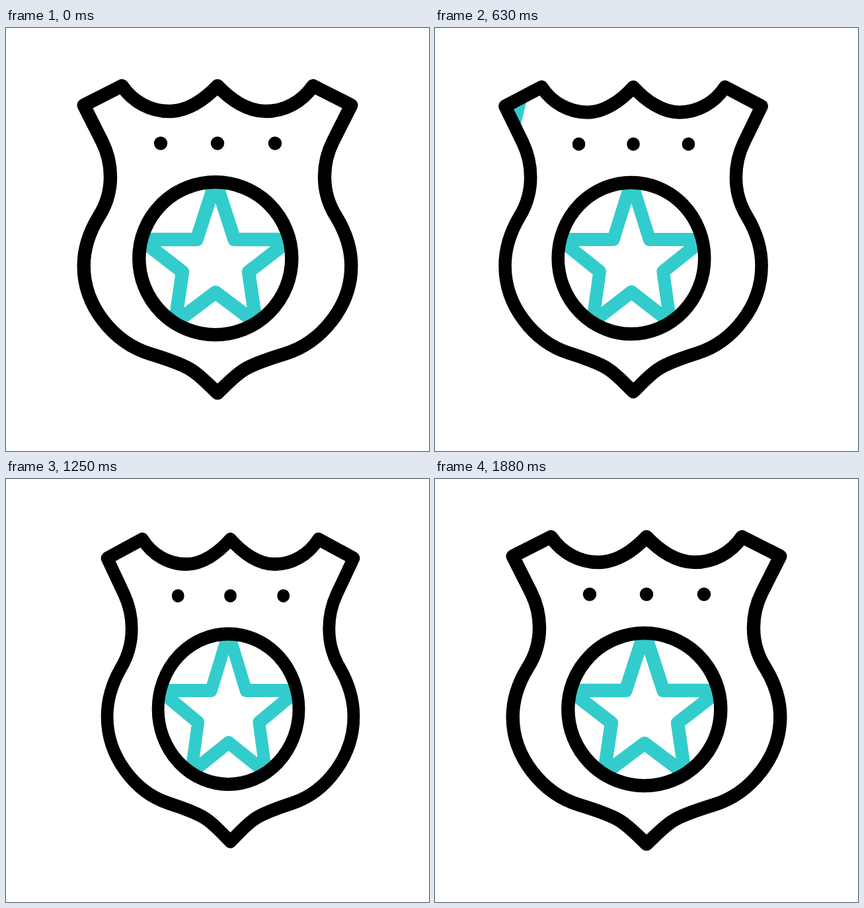
An HTML page for the animation above (2000 ms loop, 640 by 640 pixels).

```html
<!DOCTYPE html>
<html lang="en">
<head>
<meta charset="utf-8">
<title>Badge</title>
<style>
  html, body { margin: 0; width: 100%; height: 100%; overflow: hidden; background: #fff; }
  svg { display: block; width: 100%; height: 100%; }
  .line { fill: none; stroke: #000; stroke-width: 20.4; stroke-linejoin: round; stroke-linecap: round; }
  .star { stroke: #3cc; }
  .shine { fill: #3cc; }
</style>
</head>
<body>
<svg viewBox="0 0 640 640">
  <defs>
    <path id="shield" d="M320 87.5
      C300 109 274 126 247 126 C219 126 192 112 175.5 87.5
      L117.7 116.8 L145.5 172
      C154 189 158 207 158 225 C158 247 151 269 140 286
      C126 309 117.7 334 117.7 360 C117.7 421 163 476 218 493
      C237 499 261 506 278 516 C292 524 305 538 320 552.3
      C335 538 348 524 362 516 C379 506 403 499 422 493
      C477 476 522.3 421 522.3 360 C522.3 334 514 309 500 286
      C489 269 482 247 482 225 C482 207 486 189 494.5 172
      L522.3 116.8 L464.5 87.5
      C448 112 421 126 393 126 C366 126 340 109 320 87.5Z"/>
    <clipPath id="inShield"><use href="#shield"/></clipPath>
    <clipPath id="inRing"><circle cx="316.8" cy="348.6" r="116"/></clipPath>
  </defs>
  <g id="badge">
    <g clip-path="url(#inShield)">
      <g id="shine" class="shine">
        <!-- x = 0 is the leading edge at mid height -->
        <path d="M79 0H-4.6L-162.6 640H-79Z"/>
        <path d="M-77.5 0H-222.3L-380.3 640H-235.5Z"/>
      </g>
    </g>
    <g clip-path="url(#inRing)">
      <path class="line star" d="M317 232 L345.5 320 L430.1 320 L367 369 L378.2 446
        L317 400 L255.8 446 L267 369 L203.9 320 L288.5 320Z"/>
    </g>
    <circle class="line" cx="316.8" cy="348.6" r="115.5"/>
    <use href="#shield" class="line"/>
    <circle cx="234" cy="174.5" r="10.2"/>
    <circle cx="320" cy="174.5" r="10.2"/>
    <circle cx="407" cy="174.5" r="10.2"/>
  </g>
</svg>
<script>
  const LOOP = 2000, STEPS = 48;
  const badge = document.getElementById('badge');
  const shine = document.getElementById('shine');
  const smooth = (a, b, t) => {
    const u = Math.min(1, Math.max(0, (t - a) / (b - a)));
    return u * u * (3 - 2 * u);
  };

  // 24 steps a second, each starting on a whole 10 ms
  function stepAt(ms) {
    let k = Math.floor(ms * STEPS / LOOP) + 1;
    while (Math.round(k * 100 / 24) * 10 > ms) k--;
    return k % STEPS;
  }

  // Sideways sway: out to the left, across to the right, back to rest
  function sway(k) {
    if (k <= 2 || k >= 45) return 0;
    if (k <= 15.5) return -0.118 * (k - 2) ** 2;
    const d = k - 24;
    if (d < 0) return -0.7 + 3.4 * d + 0.112 * d * d;
    if (k <= 33.5) return -0.7 + 3.37 * d;
    return 0.229 * (45 - k) ** 2;
  }

  function draw(k) {
    const turn = k < 25 ? smooth(8, 25, k) : 1 - smooth(25, 39, k);
    const sx = 1 - 0.1105 * turn, sy = 1 - 0.0212 * turn;
    badge.setAttribute('transform',
      `translate(${320 + sway(k)} 320) scale(${sx} ${sy}) translate(-320 -320)`);

    const n = k - 15;
    shine.setAttribute('visibility', n >= 0 && n < 15 ? 'visible' : 'hidden');
    shine.setAttribute('transform', `translate(${99.4 + 31.1 * n + 1.5 * n * n} 0)`);
  }

  const start = performance.now();
  function tick() {
    draw(stepAt((performance.now() - start) % LOOP));
    requestAnimationFrame(tick);
  }
  tick();
</script>
</body>
</html>
```
